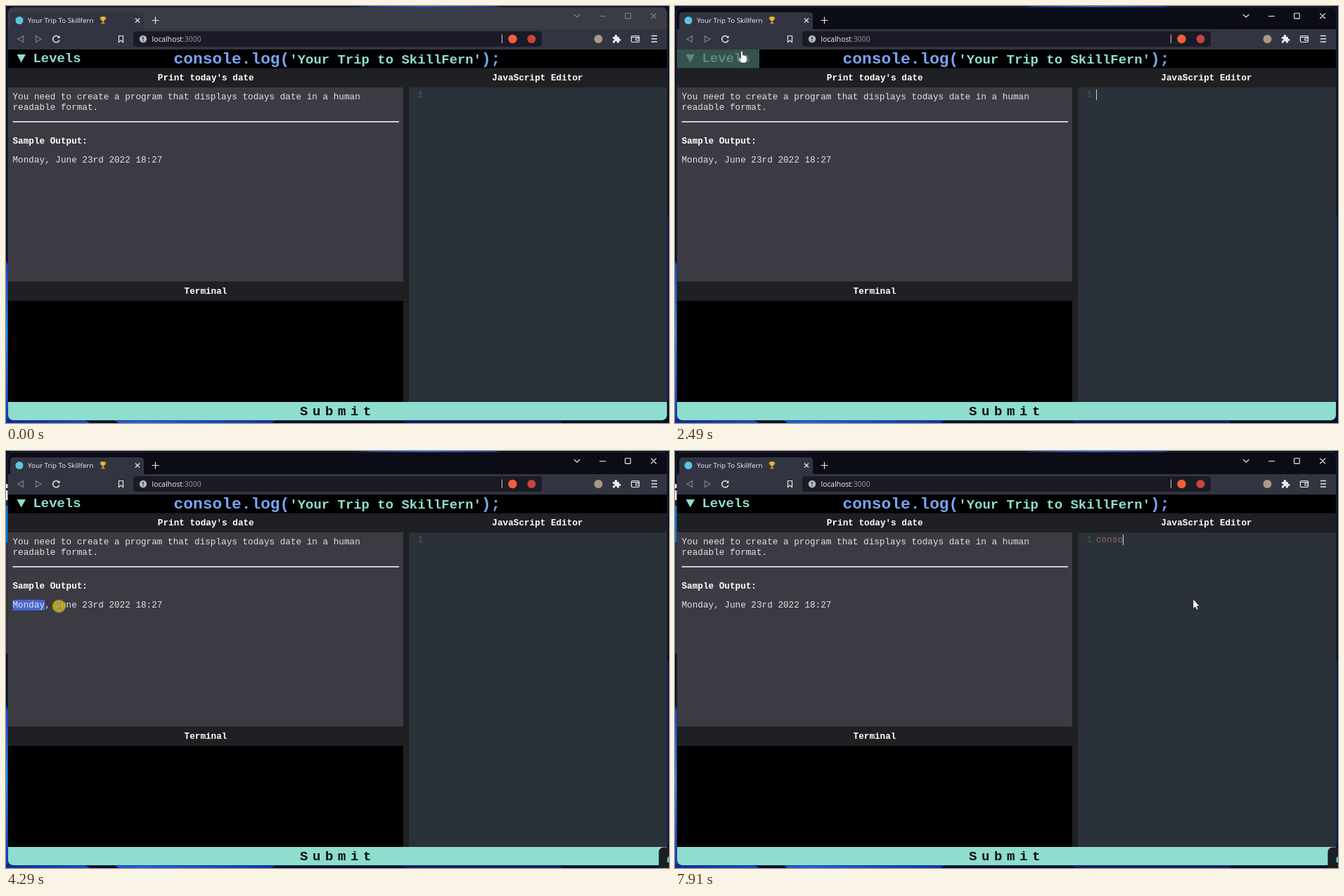
Animation of 943x594 px, one loop 8000 ms. Source, as an HTML page:

```html
<!DOCTYPE html>
<html lang="en">
<head>
<meta charset="utf-8">
<title>Coding levels</title>
<style>
  html, body { margin: 0; width: 100%; height: 100%; overflow: hidden; background: #04102a; }
  svg { position: absolute; left: 0; top: 0; display: block; }
  .mono, .code { font-family: "Courier New", "Liberation Mono", monospace; font-size: 12.68px; }
  .ui { font-family: "Open Sans", "Noto Sans", sans-serif; }
  .mono { fill: #e2e2e4; }
  .bold { font-weight: 700; fill: #fff; }
  .mid { text-anchor: middle; }
  .line { fill: none; stroke: #e8e8ec; stroke-width: 1.2; }

  /* Every animation shares one 8 s clock: 1% = 80 ms. */
  .ptr, .level-bg, .level-ink { animation: 8s linear infinite; }
  .focus, .behind, .controls, .arrow, .hand, .beam, .press, .sel, .code {
    animation: 8s step-end infinite;
  }

  .focus { animation-name: focus; }
  @keyframes focus { 0% { opacity: 0 } 15.75%, 100% { opacity: 1 } }
  .controls { animation-name: controls; }
  @keyframes controls { 0% { stroke: #85858c } 15.75%, 100% { stroke: #f4f4f6 } }
  .behind { animation-name: behind; }
  @keyframes behind { 0% { opacity: 0 } 35%, 100% { opacity: 1 } }

  .level-bg { animation-name: level-bg; fill: #8eddcf; }
  @keyframes level-bg {
    0%, 30% { opacity: 0 }
    31.125% { opacity: .37 }
    33.5%, 40.5% { opacity: 1 }
    45.5%, 100% { opacity: 0 }
  }
  .level-ink { animation-name: level-ink; }
  @keyframes level-ink {
    0%, 30% { fill: #8eddcf }
    31.125% { fill: #598b82 }
    33.5%, 40.5% { fill: #000 }
    45.5%, 100% { fill: #8eddcf }
  }

  .ptr { animation-name: move; }
  @keyframes move {
    0%, 9.625% { transform: translate(759px, 563px) }
    11.375% { transform: translate(692px, 476px) }
    14%, 20.875% { transform: translate(630px, 422px) }
    24% { transform: translate(490px, 330px) }
    28% { transform: translate(215px, 150px) }
    31.125% { transform: translate(95px, 64px) }
    34%, 36% { transform: translate(82px, 72px) }
    39.5% { transform: translate(123px, 150px) }
    42% { transform: translate(108px, 180px) }
    47%, 48.75% { transform: translate(30px, 236px) }
    50%, 51% { transform: translate(11px, 220px) }
    53.625% { transform: translate(75px, 221px) }
    59.5% { transform: translate(208px, 213px) }
    60.375%, 62% { transform: translate(218px, 215px) }
    62.875%, 64.5% { transform: translate(222px, 216px) }
    67.125%, 69.5% { transform: translate(218px, 215px) }
    72% { transform: translate(380px, 238px) }
    74.5% { transform: translate(640px, 232px) }
    76.5%, 100% { transform: translate(737px, 211px) }
  }
  .arrow { animation-name: arrow; }
  @keyframes arrow {
    0% { opacity: 0 } 9.625% { opacity: 1 } 30% { opacity: 0 }
    42% { opacity: 1 } 49.5% { opacity: 0 } 70.8%, 100% { opacity: 1 }
  }
  .hand { animation-name: hand; }
  @keyframes hand { 0% { opacity: 0 } 30% { opacity: 1 } 37% { opacity: 0 } }
  .beam { animation-name: beam; }
  @keyframes beam {
    0% { opacity: 0 } 37% { opacity: 1 } 42% { opacity: 0 }
    49.5% { opacity: 1 } 70.8%, 100% { opacity: 0 }
  }
  .press { animation-name: press; fill: #c9af12; fill-opacity: .88; }
  @keyframes press {
    0% { transform: scale(0) } 15.75% { transform: scale(1) } 16.625% { transform: scale(0) }
    50% { transform: scale(1) } 65.375% { transform: scale(.65) } 67.125% { transform: scale(.33) }
    70.375% { transform: scale(0) } 76.2% { transform: scale(1) } 77.125%, 100% { transform: scale(0) }
  }

  .sel { animation-name: sel; fill: #4866d6; }
  @keyframes sel {
    0% { width: 0 } 51.5% { width: 22.8px } 52.6% { width: 45.7px }
    60.375% { width: 213.4px } 76.2%, 100% { width: 0 }
  }

  .code {
    position: absolute; left: 599px; top: 119px; height: 15px; line-height: 15px;
    overflow: hidden; white-space: pre; color: #98625f;
    border-right: 1px solid; animation-name: type, blink;
  }
  @keyframes type {
    0% { width: 0 } 87.375% { width: 1ch } 88.375% { width: 2ch }
    89.5% { width: 3ch } 90.625% { width: 4ch } 98.875%, 100% { width: 5ch }
  }
  @keyframes blink {
    0% { border-color: transparent } 15.75% { border-color: #d0d5da }
    22.5% { border-color: transparent } 29.1% { border-color: #d0d5da }
    35.8% { border-color: transparent } 42.875% { border-color: #d0d5da }
    49.5% { border-color: transparent } 76.625% { border-color: #d0d5da }
    83.25% { border-color: transparent } 87.375% { border-color: #d0d5da }
    97.375% { border-color: transparent } 98.875%, 100% { border-color: #d0d5da }
  }
</style>
</head>
<body>
<svg width="943" height="594" viewBox="0 0 943 594">
  <defs>
    <clipPath id="win"><rect x="3" y="2" width="937" height="588" rx="7"/></clipPath>
    <linearGradient id="petal"><stop stop-color="#0a2c9c"/><stop offset=".5" stop-color="#1d62e8"/><stop offset="1" stop-color="#0b33b4"/></linearGradient>
    <linearGradient id="side" x2="0" y2="1"><stop stop-color="#1447d8"/><stop offset=".45" stop-color="#2b8be8"/><stop offset="1" stop-color="#0c38c8"/></linearGradient>
  </defs>

  <!-- desktop -->
  <rect width="943" height="594" fill="#04102a"/>
  <path d="M490 3Q505 0 520 0H690Q700 0 705 3Z" fill="url(#petal)"/>
  <path d="M0 363L4 372V594H0Z" fill="url(#side)"/>
  <path d="M0 589H110L120 594H0ZM153 589H385L378 594H160Z" fill="url(#petal)"/>
  <path d="M560 589H790V594H570Z" fill="#08226c"/>
  <path d="M939 300H943V560H939Z" fill="#071c50"/>
  <g class="behind">
    <path d="M0 47H3V53H0ZM0 56H3V70H0Z" fill="#e4e8ea"/>
    <path d="M0 70H3V78H0Z" fill="#182028"/>
    <path d="M0 78H3V130H0Z" fill="#0a78d8"/>
    <path d="M0 130H3V289H0Z" fill="#34363a"/>
    <path d="M0 289H3V330H0Z" fill="#0b0d14"/>
  </g>

  <g clip-path="url(#win)">
    <!-- browser chrome -->
    <rect x="3" y="2" width="937" height="32" fill="#3b3b44"/>
    <rect class="focus" x="3" y="2" width="937" height="32" fill="#0b0c15"/>
    <path d="M6 34V14Q6 9 11 9H191Q196 9 196 14V34Z" fill="#323541"/>
    <rect x="3" y="33" width="937" height="29" fill="#323541"/>
    <circle cx="19" cy="20.500" r="5.500" fill="#5cc4de"/>
    <text class="ui" x="31" y="24" font-size="9.800" fill="#f2f2f5">Your Trip To Skillfern</text>
    <g fill="none" stroke="#d9a32c">
      <path d="M135.500 16.500H134Q134 20 137 20.500M140.500 16.500H142Q142 20 139 20.500"/>
      <path d="M135.500 15.500H140.500V18Q140.500 21 138 21.500Q135.500 21 135.500 18Z" fill="#e9b93c"/>
      <path d="M138 21V24M135.500 24.500H140.500" stroke-width="1.500"/>
    </g>
    <g class="line">
      <path d="M184 17.500L190 23.500M190 17.500L184 23.500M207.500 20.500H217.500M212.500 15.500V25.500"/>
      <path d="M24.500 42.500V51.500L17 47ZM42.500 42.500V51.500L50 47Z" stroke="#7c7e88"/>
      <path d="M75.300 44.500A4.700 4.700 0 1 0 75.900 48.500" stroke-width="1.500"/>
      <path d="M73 45.700H76.500V42Z" fill="#e8e8ec" stroke="none"/>
      <path d="M160.500 42.500H166.500V51.500L163.500 49L160.500 51.500Z"/>
      <path d="M918 42.500H926M918 46.700H926M918 51H926" stroke-width="1.400"/>
      <rect x="889.500" y="42.500" width="11" height="9" rx="1.500"/>
      <path d="M890 44.500H900M900.500 46H896V49H900.500"/>
    </g>
    <path d="M863 44H866Q865 41 867.500 41Q870 41 869 44H872V47Q874.500 46 874.500 48.200Q874.500 50.500 872 49.500V52.500H869Q869.500 50 867.500 50Q865.500 50 866 52.500H863V49.500Q865.500 49.500 865.500 48Q865.500 46.500 863 46.800Z" fill="#ececf0"/>
    <circle cx="842.500" cy="47" r="6" fill="#a99b82"/>
    <rect x="181" y="36" width="581" height="22" rx="4" fill="#1a1b26"/>
    <circle cx="195" cy="47" r="5.200" fill="#b7b8be"/>
    <path d="M195 44V47.700M195 49V50.300" stroke="#1a1b26" stroke-width="1.300"/>
    <text class="ui" x="207.500" y="50.600" font-size="10.400" fill="#f2f2f5">localhost<tspan fill="#9899a3">:3000</tspan></text>
    <path d="M705.500 40.500V53" stroke="#c4c5cc"/>
    <circle cx="720.500" cy="47" r="6.200" fill="#f0603a"/>
    <circle cx="747.500" cy="47" r="6" fill="#c8443c"/>
    <g class="controls" fill="none" stroke-width="1.100">
      <path d="M808 12L812.200 16L816.400 12M844 14.500H853M917.300 10.300L925 18M925 10.300L917.300 18"/>
      <rect x="880.700" y="10.300" width="7.600" height="7.600" rx="1"/>
    </g>

    <!-- page -->
    <rect x="3" y="62" width="937" height="528" fill="#1e2023"/>
    <rect x="3" y="62" width="937" height="26.500" fill="#000"/>
    <rect class="level-bg" x="3" y="62" width="117" height="26.500"/>
    <g class="level-ink">
      <path d="M15.500 69H28L21.700 80.500Z"/>
      <text class="mono" x="38.500" y="80" style="fill:inherit;font-size:18.900px;font-weight:700">Levels</text>
    </g>
    <text class="mono bold" x="238.500" y="81.500" style="fill:#78a4f4;font-size:22.900px">console.log(<tspan font-size="18.950" fill="#8eddcf" style="font-size:18.950px">'Your Trip to SkillFern'</tspan>);</text>

    <text class="mono bold mid" x="284.300" y="105.500">Print today's date</text>
    <text class="mono bold mid" x="756" y="105.500">JavaScript Editor</text>
    <rect x="3" y="116" width="562" height="276.500" fill="#3c3b43"/>
    <rect x="573" y="116" width="367" height="448" fill="#2b3138"/>
    <text class="mono" x="9.500" y="133">You need to create a program that displays todays date in a human</text>
    <text class="mono" x="9.500" y="147.500">readable format.</text>
    <rect x="9.500" y="164" width="549.500" height="1.700" fill="#e4e4e6"/>
    <text class="mono bold" x="9.500" y="195.500">Sample Output:</text>
    <rect class="sel" x="9.500" y="212" height="15"/>
    <text class="mono" x="9.500" y="223">Monday, June 23rd 2022 18:27</text>
    <text class="mono" x="585.500" y="130" style="fill:#4c5862">1</text>
    <text class="mono bold mid" x="284" y="410">Terminal</text>
    <rect x="3" y="420" width="562" height="144" fill="#000"/>
    <rect x="3" y="564" width="937" height="26" fill="#8eddcf"/>
    <text class="mono bold" x="418" y="583" style="fill:#080c0c;font-size:19px;letter-spacing:6.600px">Submit</text>
  </g>
  <rect x="2.500" y="1.500" width="938" height="589" rx="7.500" fill="none" stroke="#263556" stroke-opacity=".6"/>

  <g class="behind">
    <path d="M928.500 594V572Q928.500 564.500 936 564.500H943V594Z" fill="#1b1e23"/>
    <path d="M943 577L940.500 580V586H943Z" fill="#56c4e4"/>
  </g>
</svg>

<div class="code">conso</div>

<svg width="943" height="594" viewBox="0 0 943 594">
  <g class="ptr">
    <circle class="press" r="9.300"/>
    <path class="arrow" d="M0 0V13.500L3 10.800L5 15.300L7.200 14.300L5.200 9.900H9Z" fill="#fff" stroke="#222" stroke-width=".6"/>
    <path class="hand" d="M-1.500 1Q0 -1 1.300 1V6Q3 5 4 6.500Q5.500 6 6 7.500Q7.500 7.200 7.500 9V12Q7.500 15 5.500 17H-1Q-2 14.500 -4.500 11.500Q-5 9.500 -3 9.800L-1.500 11Z" fill="#fff" stroke="#222" stroke-width=".6"/>
    <g class="beam" fill="none">
      <path d="M-3 -6.500Q0 -6.500 0 -5Q0 -6.500 3 -6.500M0 -5V5.500M-3 7Q0 7 0 5.500Q0 7 3 7" stroke="#33333a" stroke-width="2.200"/>
      <path d="M-3 -6.500Q0 -6.500 0 -5Q0 -6.500 3 -6.500M0 -5V5.500M-3 7Q0 7 0 5.500Q0 7 3 7" stroke="#e8e8e8" stroke-width="1.100"/>
    </g>
  </g>
</svg>
</body>
</html>
```
